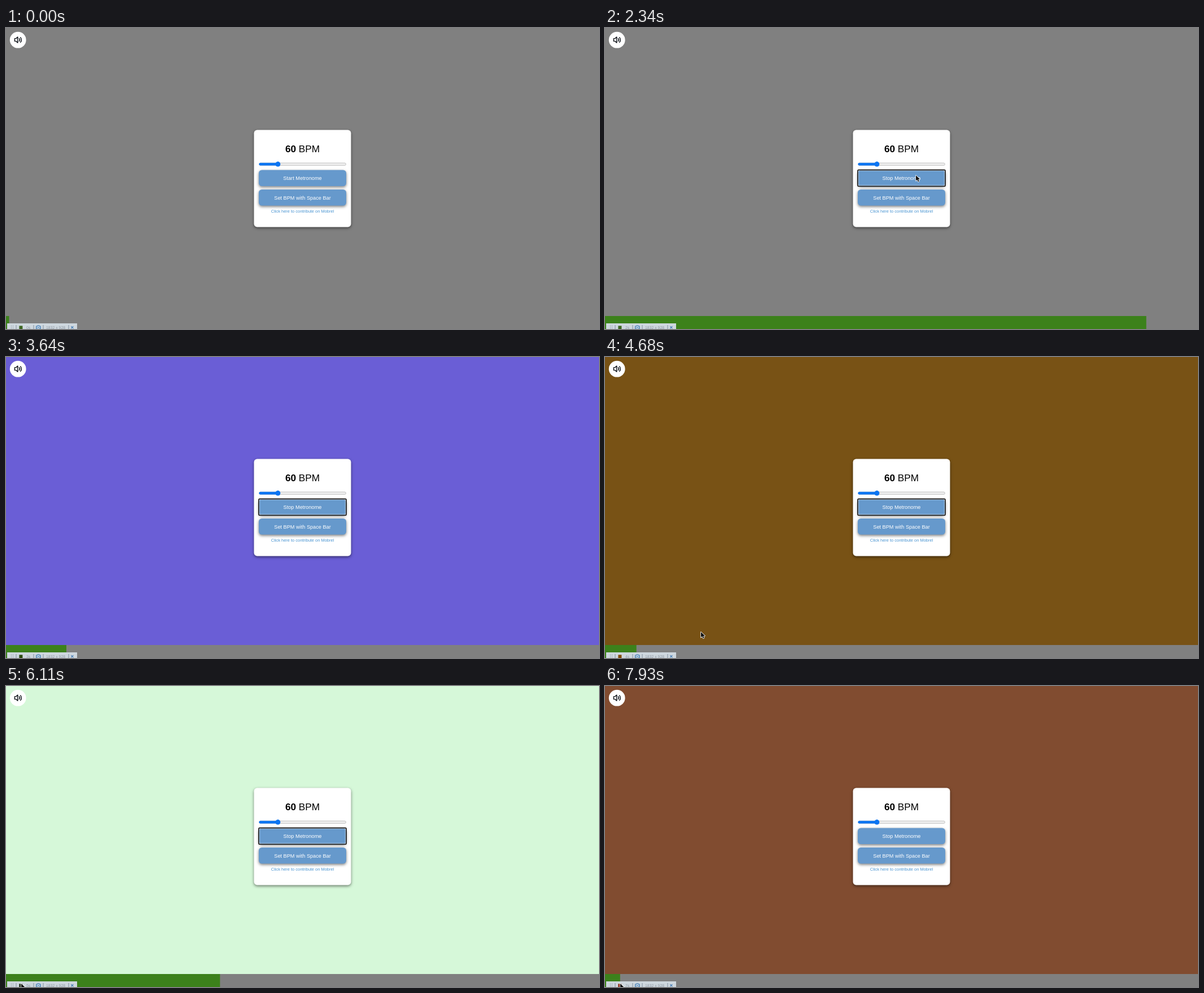
Recreate the animation shown at these times as an HTML page with a canvas. Size 1051 px wide and 533 px high, loop 8.06 s.

```html
<!DOCTYPE html>
<html lang="en">
<head>
<meta charset="utf-8">
<title>Metronome</title>
<style>
html, body { margin: 0; width: 100%; height: 100%; overflow: hidden; background: #808080; }
canvas { display: block; width: 1051px; height: 533px; }
</style>
</head>
<body>
<canvas id="stage" width="1051" height="533"></canvas>
<script>
const ctx = document.getElementById('stage').getContext('2d');
const W = 1051, H = 533;
const LOOP = 8060, STEP = 130;
const START = 1342, SPEED = 0.91462 / 1000;
const FONT = '"Liberation Sans", Arial, sans-serif';
const BEAT_COLORS = ['#808080', '#5f8a7d', '#6a5ed6', '#785215', '#d6f8d9', '#762742', '#814c30'];
const STOP_COLORS = ['#3d6620', '#2f4a1c', '#2c4a10', '#804a08', '#1c2a14', '#7a1030', '#8a2810'];

// Pointer path: time, x, y
const ENTER = [[260, 300, 420], [780, 621, 300], [1040, 586, 270], [1300, 551, 261], [2990, 551, 261]];
const LEAVE = [[4160, 420, 350], [4420, 300, 420], [4680, 170, 487], [5070, 27, 527], [LOOP, 27, 527]];

function roundRect(x, y, w, h, r) {
  ctx.beginPath();
  ctx.roundRect(x, y, w, h, r);
}

function raised(x, y, w, h, r, color) {
  ctx.save();
  ctx.shadowColor = 'rgba(0,0,0,0.5)';
  ctx.shadowBlur = 5;
  ctx.shadowOffsetY = 2;
  ctx.fillStyle = color;
  roundRect(x, y, w, h, r);
  ctx.fill();
  ctx.restore();
}

function label(text, x, y, size, color, align = 'center', weight = '') {
  ctx.font = `${weight} ${size}px ${FONT}`;
  ctx.textAlign = align;
  ctx.fillStyle = color;
  ctx.fillText(text, x, y);
}

function line(x1, y1, x2, y2) {
  ctx.beginPath();
  ctx.moveTo(x1, y1);
  ctx.lineTo(x2, y2);
  ctx.stroke();
}

function disc(x, y, r, color) {
  ctx.fillStyle = color;
  ctx.beginPath();
  ctx.arc(x, y, r, 0, Math.PI * 2);
  ctx.fill();
}

function polygon(points) {
  ctx.beginPath();
  points.forEach(([x, y]) => ctx.lineTo(x, y));
  ctx.closePath();
}

function drawSpeaker() {
  disc(21.2, 21.2, 14.4, '#fff');
  ctx.save();
  ctx.translate(21.4, 21);
  ctx.scale(0.6, 0.6);
  ctx.strokeStyle = '#0c1118';
  ctx.lineWidth = 2.4;
  ctx.lineCap = ctx.lineJoin = 'round';
  polygon([[-1, -8.5], [-6, -4], [-10, -4], [-10, 4], [-6, 4], [-1, 8.5]]);
  ctx.stroke();
  for (const r of [5, 10]) {
    ctx.beginPath();
    ctx.arc(0, 0, r, -Math.PI / 4, Math.PI / 4);
    ctx.stroke();
  }
  ctx.restore();
}

function drawSlider() {
  ctx.fillStyle = '#efefef';
  ctx.strokeStyle = '#a8a8a8';
  ctx.lineWidth = 0.7;
  roundRect(448.8, 239, 153.6, 4.3, 2.1);
  ctx.fill();
  ctx.stroke();
  ctx.fillStyle = '#0b75f2';
  roundRect(448.4, 238.7, 34, 4.9, 2.4);
  ctx.fill();
  disc(481.9, 241.1, 4.5, '#0b75f2');
}

function drawButton(y, text, focused) {
  raised(448, y, 155, 28.6, 5.5, '#6699cc');
  if (focused) {
    ctx.lineWidth = 0.7;
    ctx.strokeStyle = '#fff';
    roundRect(449.1, y + 1.1, 152.8, 26.4, 1);
    ctx.stroke();
    ctx.lineWidth = 1.6;
    ctx.strokeStyle = '#101010';
    roundRect(447.9, y - 0.1, 155.2, 28.8, 1.5);
    ctx.stroke();
  }
  label(text, 525.5, y + 17.6, 9.18, '#fff');
}

function drawCard(running, focused) {
  raised(439.5, 180.5, 172, 172, 5.7, '#fff');
  label('60', 494.9, 220, 17.2, '#000', 'left', 'bold');
  label('BPM', 556.1, 220, 17.2, '#000', 'right');
  drawSlider();
  drawButton(251.5, running ? 'Stop Metronome' : 'Start Metronome', focused);
  drawButton(286, 'Set BPM with Space Bar', false);
  label('Click here to contribute on Mobrel', 525.5, 327.3, 7.46, '#4793d1');
}

function drawToolbar(seconds, stopColor) {
  ctx.fillStyle = '#ced7de';
  ctx.fillRect(2, 523, 124, 10);
  for (let i = 0; i < 6; i++) {
    ctx.fillStyle = '#8793a0';
    ctx.fillRect(9 + (i % 2) * 3, 526.5 + (i >> 1) * 2.4, 1, 1);
  }
  ctx.strokeStyle = '#778797';
  ctx.lineWidth = 0.9;
  for (const x of [18, 49, 66, 111]) line(x, 526, x, 533);

  ctx.fillStyle = stopColor;
  ctx.fillRect(23.4, 527.4, 6, 5.6);
  label(seconds + 's', 36, 532.6, 6.9, '#919ba6', 'left');
  label('1832 x 928', 71, 532.6, 6.9, '#919ba6', 'left');

  ctx.fillStyle = '#6d9ac4';
  roundRect(52.8, 527.2, 9.2, 6.5, 1.2);
  ctx.fill();
  ctx.fillRect(55.3, 526.2, 4.2, 2);
  disc(57.4, 530.4, 2.3, '#e2eaf0');
  disc(57.4, 530.4, 1.4, '#6d9ac4');

  ctx.strokeStyle = '#3d78b4';
  ctx.lineWidth = 1.2;
  line(115.4, 528.2, 119.4, 532.2);
  line(119.4, 528.2, 115.4, 532.2);
}

function pointerAt(t) {
  for (const path of [ENTER, LEAVE]) {
    for (let i = 1; i < path.length; i++) {
      const [t0, x0, y0] = path[i - 1], [t1, x1, y1] = path[i];
      if (t < t0 || t > t1) continue;
      const k = (t - t0) / (t1 - t0);
      return [x0 + (x1 - x0) * k, y0 + (y1 - y0) * k];
    }
  }
  return null;
}

function drawPointer([x, y]) {
  ctx.save();
  ctx.translate(x, y);
  polygon([[0, 0], [0, 9.6], [2.3, 7.6], [4, 11.2], [5.7, 10.4], [4.1, 7], [7.1, 6.8]]);
  ctx.lineJoin = 'round';
  ctx.lineWidth = 1.6;
  ctx.strokeStyle = '#fff';
  ctx.stroke();
  ctx.fillStyle = '#111';
  ctx.fill();
  ctx.restore();
}

function draw(t) {
  const running = t >= START;
  const beats = running ? (t - START) * SPEED : 0;
  const beat = Math.floor(beats);

  ctx.fillStyle = BEAT_COLORS[beat];
  ctx.fillRect(0, 0, W, H);
  ctx.fillStyle = '#808080';
  ctx.fillRect(0, 510, W, 23);
  ctx.fillStyle = '#3c811b';
  ctx.fillRect(0, 510, Math.max(5.5, (beats - beat) * W), 23);

  drawSpeaker();
  drawCard(running, running && t < 7930);
  drawToolbar(Math.floor(t * SPEED), STOP_COLORS[beat]);
  const pointer = pointerAt(t);
  if (pointer) drawPointer(pointer);
}

const origin = performance.now();
function tick() {
  const t = (performance.now() - origin) % LOOP;
  draw(Math.floor(t / STEP) * STEP);
  requestAnimationFrame(tick);
}
tick();
</script>
</body>
</html>
```
